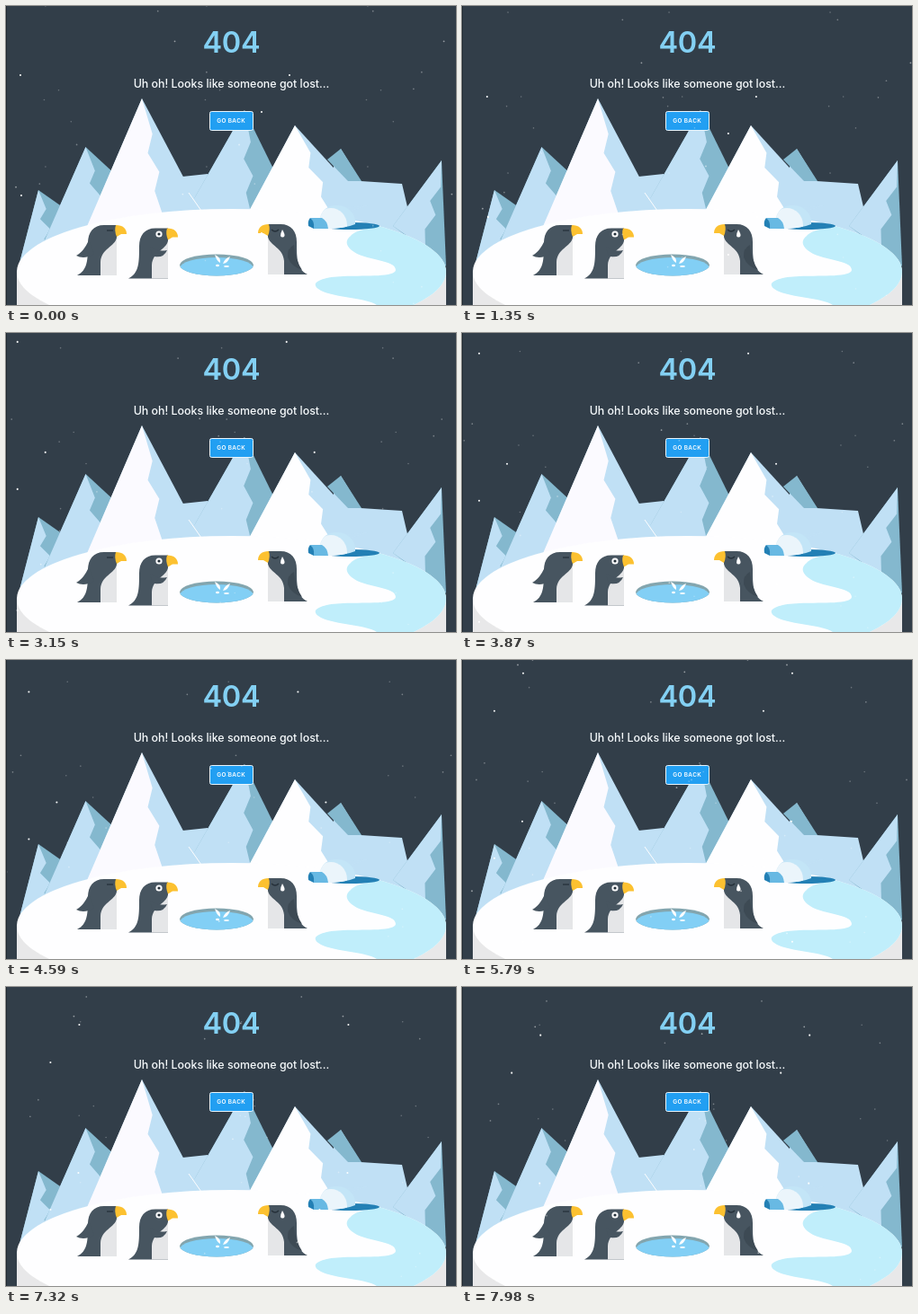
Recreate the animation shown at these times as an HTML page with a canvas. Size 500 by 333 pixels, loop 8 s.

```html
<!DOCTYPE html>
<html lang="en">
<head>
<meta charset="utf-8">
<title>404</title>
<style>
  html, body { margin: 0; width: 100%; height: 100%; overflow: hidden; background: #323e49; }
  canvas { display: block; width: 500px; height: 333px; }
</style>
</head>
<body>
<canvas id="stage" width="500" height="333"></canvas>
<script>
const ctx = document.getElementById('stage').getContext('2d');
const LOOP = 8000, STEP = 30;
const WHITE = '#fefeff', PALE = '#c0e0f5', SHADE = '#84b8ce';
const SLATE = '#475560', BELLY = '#e5e6e8', YELLOW = '#fcc130', INK = '#26313a';

function shape(color, d) {
  ctx.fillStyle = color;
  ctx.fill(new Path2D(d));
}

function line(color, width, d) {
  ctx.strokeStyle = color;
  ctx.lineWidth = width;
  ctx.stroke(new Path2D(d));
}

function ellipse(x, y, rx, ry = rx) {
  const path = new Path2D();
  path.ellipse(x, y, rx, ry, 0, 0, Math.PI * 2);
  return path;
}

function oval(color, x, y, rx, ry) {
  ctx.fillStyle = color;
  ctx.fill(ellipse(x, y, rx, ry));
}

function inside(path, paint) {
  ctx.save();
  ctx.clip(path);
  paint();
  ctx.restore();
}

function label(text, x, y, font, color, spacing = 0) {
  ctx.font = font + ' Inter, sans-serif';
  ctx.letterSpacing = spacing + 'px';
  ctx.textAlign = 'center';
  ctx.fillStyle = color;
  ctx.fillText(text, x + spacing / 2, y);
}

// A peak with a lit left face; a zigzag ridge runs from the top to its foot.
function peak(top, left, right, foot, lit, shade) {
  shape(shade, `M${top} L${left} L${right} Z`);
  let ridge = '';
  for (let k = 0; k < 4; k++) {
    const f = 0.3 + k * 0.16, bend = k % 2 ? -4.5 : 4.5;
    const x = top[0] + (foot[0] - top[0]) * f + bend;
    const y = top[1] + (foot[1] - top[1]) * f;
    ridge += `L${x} ${y}`;
  }
  shape(lit, `M${top} ${ridge} L${foot} L${left} Z`);
}

function mountains() {
  peak([36, 205], [14, 290], [90, 243], [50, 275], PALE, SHADE);
  peak([88.5, 157], [39, 270], [150, 214], [108, 245], PALE, SHADE);
  shape(PALE, 'M196 190 L224 187 L250 232 H190 Z');
  peak([265, 116], [198, 234], [322, 232], [273, 234], PALE, SHADE);
  peak([151, 103], [88, 250], [219, 232], [175, 235], '#fbfaff', PALE);
  line(WHITE, 1, 'M203 208 L217 228');
  shape(PALE, 'M340 240 L372 159 L394 195 L440 198 L447 228 L480 285 Z');
  shape(SHADE, 'M357 171 L372 159 L395 195 H380 Z');
  peak([321, 133], [266, 236], [402, 222], [364, 235], WHITE, PALE);
  shape(PALE, 'M364 235 L402 222 V250 Z');
  peak([484, 172], [430, 245], [489, 290], [466, 270], PALE, SHADE);
}

function ground() {
  const top = ellipse(250.5, 296, 238.5, 70);
  shape('#e8e8e9', 'M12 296 H489 V333 H12 Z');
  ctx.fillStyle = WHITE;
  ctx.fill(top);
  inside(top, () => shape('#c0eefb',
    'M383 256 C390 248 412 246 430 244 L500 250 V333 H412 ' +
    'C400 325 367 325 350 317 C336 310 346 302 375 301 C402 300 432 302 433 294 ' +
    'C433 282 398 284 384 272 C377 266 377 261 383 256 Z'));
}

function igloo() {
  oval('#2380b5', 382, 245, 33, 4);
  const dome = new Path2D('M348 248 C347 230 355 222 367 222 C380 222 389 231 388 243 Q374 249 348 248 Z');
  ctx.fillStyle = '#c3e5f7';
  ctx.fill(dome);
  inside(dome, () => oval('#ebf5fb', 361, 244, 18, 19));
  shape('#68b9e3', 'M338 236 H351 Q357 239 358 248 H342 Q343 240 338 236 Z');
  shape('#2380b5', 'M338 236 Q343 239 342 248 L336 245 Q335 239 338 236 Z');
}

function hole() {
  const rim = ellipse(234, 288.5, 41, 12);
  ctx.fillStyle = '#83a5ae';
  ctx.fill(rim);
  inside(rim, () => oval('#82cff5', 234, 292, 41, 12));
  shape(WHITE, 'M232 277 Q239 280 238 286 Q234 284 232 277 Z');
  shape(WHITE, 'M249 279 Q243 281 241 287 Q247 286 249 279 Z');
  oval(WHITE, 235, 289, 2, 1.2);
  oval(WHITE, 245, 290, 3, 1);
}

// Standing bird; the origin is where the top of the beak meets the head.
function bird(x, y, dir = 1) {
  ctx.save();
  ctx.translate(x, y);
  ctx.scale(dir, 1);
  shape(SLATE, 'M0 0 H-14 C-26 0 -32 8 -32 20 C-32 38 -32 50 -44 56 H0 Z');
  shape(BELLY, 'M0 14 C-2 24 -17 26 -18 41 V56 H0 Z');
  shape(YELLOW, 'M-1 0 C7 0 11 4 11 10 H5 L0 13 Q-3 6 -1 0 Z');
  ctx.restore();
}

function birds() {
  bird(123, 244);
  shape(SLATE, 'M92 261 C88 269 85 274 78 278 Q87 283 98 276 Z');
  line(INK, 1.3, 'M112 250 H119');

  bird(180, 247.5);
  shape(SLATE, 'M161 268 Q167 274 179 272 Q175 281 165 279 Q160 276 161 268 Z');
  oval(WHITE, 170, 254, 3.6);
  oval(INK, 170, 254, 1.6);

  bird(291, 243, -1);
  shape('#3d4a54', 'M320 266 Q312 270 313 280 Q317 290 329 294 Q322 284 320 266 Z');
  line(INK, 1.3, 'M295 249 Q299 253 303 249');
  shape(WHITE, 'M307 249 Q310 254 309.5 256 A2.4 2.4 0 0 1 305 256 Q305 253 307 249 Z');
}

function heading() {
  label('404', 250.5, 52, '600 32.5px', '#83d0f3', -0.3);
  label('Uh oh! Looks like someone got lost...', 250.5, 91, '500 12.4px', '#f6fafc');
  ctx.beginPath();
  ctx.roundRect(226.5, 117.5, 48, 21, 2);
  ctx.fillStyle = '#229ff2';
  ctx.fill();
  ctx.strokeStyle = '#e8f5fd';
  ctx.lineWidth = 1;
  ctx.stroke();
  label('GO BACK', 250, 130.3, '600 6.4px', '#fff', 0.4);
}

function scatter(count, tile, seed) {
  const next = () => (seed = (seed * 16807) % 2147483647) / 2147483647;
  return Array.from({ length: count }, () => [next() * tile, next() * tile]);
}

// Each layer is a repeating tile that drifts at its own speed (px per second).
const layers = [
  { tile: 299, vx: 8.8, vy: 17.75, r: 1.05, alpha: 0.95,
    dots: [[16, 77], [284, 118], [17, 211], [284, 253]] },
  { tile: 299, vx: 8.8, vy: 17.75, r: 0.9, alpha: 0.5, dots: scatter(4, 299, 4711) },
  { tile: 239, vx: 7.1, vy: 7.1, r: 0.85, alpha: 0.35, dots: scatter(5, 239, 90210) },
  { tile: 179, vx: 5.3, vy: 5.3, r: 0.8, alpha: 0.28, dots: scatter(4, 179, 31337) }
];

function snow(sec) {
  for (const { tile, vx, vy, r, alpha, dots } of layers) {
    ctx.globalAlpha = alpha;
    for (const [dx, dy] of dots) {
      const x0 = (dx + vx * sec) % tile, y0 = (dy + vy * sec) % tile;
      for (let x = x0 - tile; x < 502; x += tile)
        for (let y = y0 - tile; y < 335; y += tile) oval('#fff', x, y, r);
    }
  }
  ctx.globalAlpha = 1;
}

function draw(ms) {
  ctx.fillStyle = '#323e49';
  ctx.fillRect(0, 0, 500, 333);
  mountains();
  ground();
  igloo();
  hole();
  birds();
  heading();
  snow(ms / 1000);
  ctx.fillStyle = '#1f2931';
  ctx.fillRect(0, 0, 1, 333);
}

const start = performance.now();
function tick() {
  const t = (performance.now() - start) % LOOP;
  draw(Math.floor(t / STEP) * STEP);
  requestAnimationFrame(tick);
}
tick();
</script>
</body>
</html>
```
